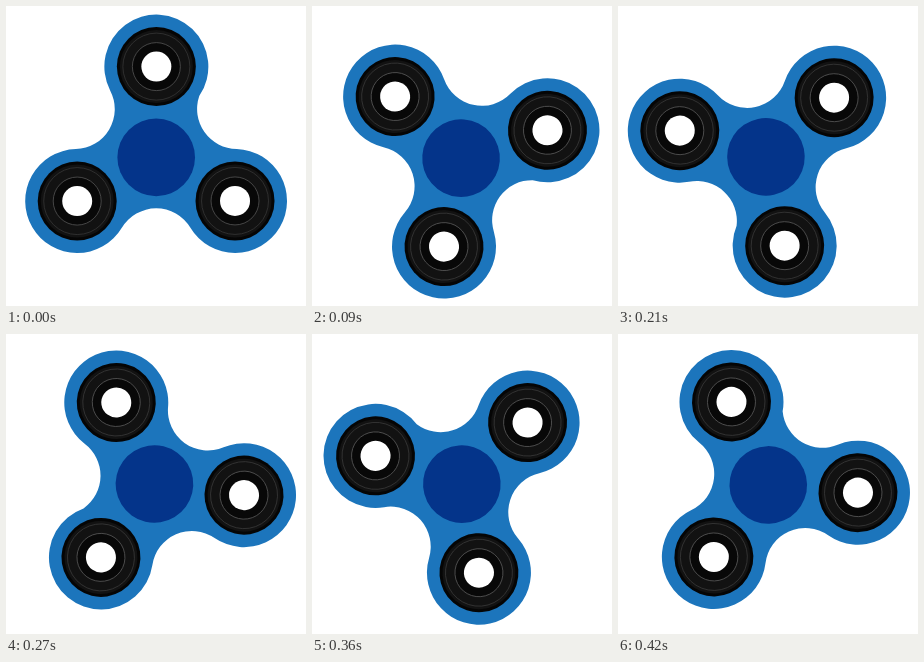
Animation, 300 px wide and 300 px high, one loop 0.45 s. Source, as an HTML page:

```html
<!DOCTYPE html>
<html lang="en">
<head>
<meta charset="utf-8">
<title>Fidget spinner</title>
<style>
  html, body { margin: 0; width: 100%; height: 100%; overflow: hidden; background: #fff; }
  svg { display: block; width: 100vw; height: 100vh; }
</style>
</head>
<body>
<svg viewBox="0 0 300 300">
  <defs>
    <g id="bearing">
      <circle r="39.5" fill="#050505"/>
      <circle r="36.5" fill="#121212"/>
      <circle r="33.5" fill="#121212" stroke="#3c3c3c" stroke-width=".7"/>
      <circle r="24" fill="#080808" stroke="#555" stroke-width=".8"/>
      <circle r="15" fill="#fff"/>
    </g>
  </defs>
  <g id="spinner">
    <path id="body" fill="#1c75bc"/>
    <circle cx="1.1" cy=".4" r="38.8" fill="#04348a"/>
  </g>
</svg>
<script>
const CENTER = [149.1, 151], LOBE = 52, FILLET = 40;
const STEP_MS = 30, STEP_DEG = 24, LOOP_MS = 450;
const spinner = document.getElementById('spinner');

const polar = (r, deg, [x, y] = [0, 0]) => {
  const a = deg * Math.PI / 180;
  return [x + r * Math.cos(a), y + r * Math.sin(a)];
};
const angle = (p, q) => Math.atan2(q[1] - p[1], q[0] - p[0]) * 180 / Math.PI;

const lobes = [polar(90.4, -89.2), polar(91.2, 28.8), polar(89.5, 150.5)];

// Centre of the concave arc that touches two neighbouring lobes.
function filletCenter(p, q) {
  const mid = [(p[0] + q[0]) / 2, (p[1] + q[1]) / 2];
  const half = Math.hypot(q[0] - p[0], q[1] - p[1]) / 2;
  return polar(Math.sqrt((LOBE + FILLET) ** 2 - half ** 2), angle(p, q) - 90, mid);
}

const pt = p => p.map(v => v.toFixed(2)).join(' ');

function bodyPath() {
  let d = '';
  lobes.forEach((p, i) => {
    const next = lobes[(i + 1) % 3], prev = lobes[(i + 2) % 3];
    const start = polar(LOBE, angle(p, filletCenter(prev, p)), p);
    const kink = i ? 0 : 7;
    const end = polar(LOBE, angle(p, filletCenter(p, next)) + kink, p);
    d += i ? `A${FILLET} ${FILLET} 0 0 0 ${pt(start)}` : `M${pt(start)}`;
    d += `A${LOBE} ${LOBE} 0 1 1 ${pt(end)}`;
  });
  const first = polar(LOBE, angle(lobes[0], filletCenter(lobes[2], lobes[0])), lobes[0]);
  return d + `A${FILLET} ${FILLET} 0 0 0 ${pt(first)}Z`;
}

document.getElementById('body').setAttribute('d', bodyPath());
for (const [x, y] of lobes) {
  const use = document.createElementNS('http://www.w3.org/2000/svg', 'use');
  use.setAttribute('href', '#bearing');
  use.setAttribute('transform', `translate(${x} ${y})`);
  spinner.append(use);
}

function draw(ms) {
  const turn = Math.floor((ms % LOOP_MS) / STEP_MS) * STEP_DEG;
  spinner.setAttribute('transform', `translate(${CENTER}) rotate(${turn})`);
}

let begin;
function tick(now) {
  begin ??= now;
  draw(Math.max(0, now - begin));
  requestAnimationFrame(tick);
}
draw(0);
requestAnimationFrame(tick);
</script>
</body>
</html>
```
